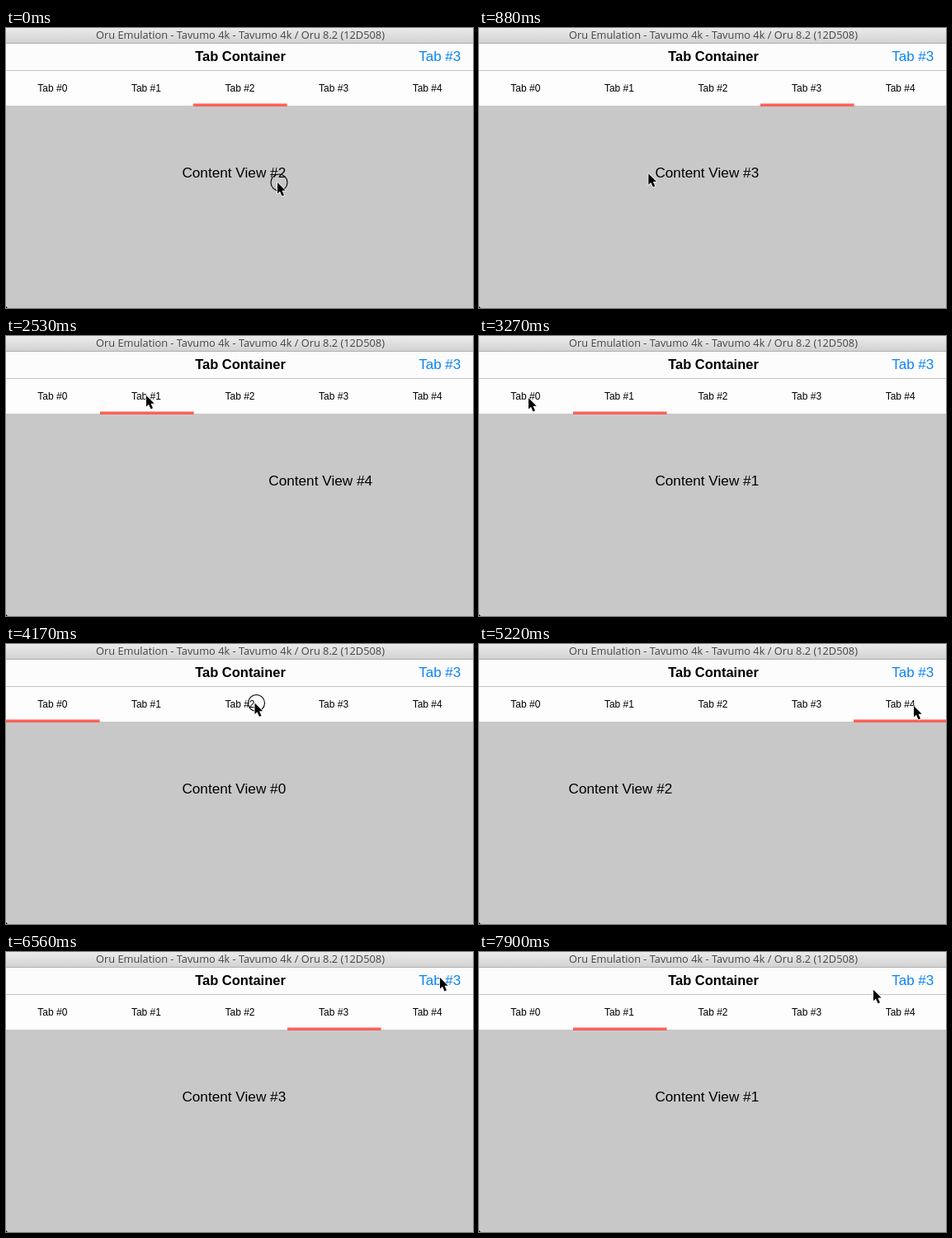
These frames come from a looping animation (566 px wide and 339 px high, 8000 ms). An HTML page:

```html
<!DOCTYPE html>
<html lang="en">
<head>
<meta charset="utf-8">
<title>Tab Container</title>
<style>
  html, body { margin: 0; width: 100%; height: 100%; overflow: hidden; background: #c8c8c8; }
  svg { display: block; }
  text { font-family: "Liberation Sans", Arial, sans-serif; text-anchor: middle; }
  .window-title { font: 12.8px "Open Sans", sans-serif; fill: #444; }
  .heading { font-size: 16.5px; font-weight: bold; }
  .button { font-size: 17px; fill: #0a84f5; }
  .tab { font-size: 12px; }
  .page { font-size: 17.2px; }
</style>
</head>
<body>
<svg width="566" height="339" viewBox="0 0 566 339">
  <defs>
    <linearGradient id="chrome" x2="0" y2="1">
      <stop stop-color="#ebebeb"/>
      <stop offset="1" stop-color="#d2d2d2"/>
    </linearGradient>
  </defs>
  <rect width="566" height="339" fill="#c8c8c8"/>
  <rect width="566" height="18" fill="url(#chrome)"/>
  <rect y="18" width="566" height="1" fill="#b0b0b0"/>
  <text class="window-title" x="284" y="13">Oru Emulation - Tavumo 4k - Tavumo 4k / Oru 8.2 (12D508)</text>
  <rect y="19" width="566" height="32" fill="#fcfcfc"/>
  <rect y="51" width="566" height="1" fill="#c4c4c4"/>
  <text class="heading" x="284" y="40">Tab Container</text>
  <text class="button" x="525.7" y="40">Tab #3</text>
  <rect y="52" width="566" height="42" fill="#fdfdfd"/>
  <g id="tabs"></g>
  <rect id="indicator" y="91.5" width="113.6" height="3.5" fill="#fc6158"/>
  <text class="page" id="outgoing" y="181"></text>
  <text class="page" id="incoming" y="181"></text>
  <path d="M0 337 L2 339 H0Z"/>
  <g id="cursor">
    <circle id="press" cx="2" r="10" fill="none" stroke="#000" stroke-width="1.1"/>
    <path d="M0 0 V13.5 L3 10.7 L5.5 16.4 L8 15.3 L5.5 9.7 H9.7Z"
          stroke="#fff" stroke-width="1.6" paint-order="stroke" stroke-linejoin="round"/>
  </g>
</svg>
<script>
const LOOP = 8000, STEP = 149, WIDTH = 566, TAB = 113.6, CENTER = 276.3;
const TRAVEL = 4, DRAG = 146.5, DRAG_END_Y = 175.5;
const $ = id => document.getElementById(id);

// The pointer leaves its last place, presses at (x, y) and brings up a page. Times are in steps.
const swipe = (leave, press, x, y, page) =>
  ({ leave, press, x, y, page, endX: x - DRAG, endY: DRAG_END_Y, hold: 5, start: press, span: 2.9, switchAt: 0.5 });
const tap = (leave, press, x, y, page) =>
  ({ leave, press, x, y, page, endX: x, endY: y, hold: 1, start: press + 0.75, span: 2, switchAt: 0 });

const gestures = [
  swipe(-4, 0.33, 329, 187, 3),
  swipe(4, 8.27, 329, 180, 4),
  tap(12, 15.7, 170, 72, 1),
  tap(18, 24, 60, 75, 0),
  tap(25, 28, 301.5, 71.5, 2),
  tap(29, 33.7, 527, 75, 4),
  tap(35, 40, 526, 31, 3),
  tap(46, 49, 170, 72, 1),
  tap(50, Infinity, 535, 41, 3),
];

const clamp = x => Math.min(1, Math.max(0, x));
const ease = x => clamp(x) ** 2 * (3 - 2 * clamp(x));
const mix = (a, b, k) => a + (b - a) * k;
const progressOf = (g, step) => ease((step - g.start) / g.span);

function placePage(id, page, x) {
  $(id).textContent = `Content View #${page}`;
  $(id).setAttribute("x", x);
}

function drawPages(step) {
  const index = Math.max(0, gestures.findLastIndex(g => step >= g.start));
  const gesture = gestures[index];
  const to = gesture.page, from = index ? gestures[index - 1].page : 2;
  const progress = progressOf(gesture, step);
  const shift = Math.sign(to - from) * WIDTH;
  placePage("outgoing", from, CENTER - shift * progress);
  placePage("incoming", to, CENTER + shift * (1 - progress));
  $("indicator").setAttribute("x", Math.round(TAB * (progress > gesture.switchAt ? to : from)));
}

function drawPointer(step) {
  const index = gestures.findLastIndex(g => step >= g.leave);
  const gesture = gestures[index];
  const pressStep = Math.floor(gesture.press);
  const previous = gestures[Math.max(0, index - 1)];
  const arrive = Math.min(pressStep, gesture.leave + TRAVEL);
  const travel = ease((step - gesture.leave) / (arrive - gesture.leave));
  // A dragged page follows the finger until it is let go.
  const drag = clamp(WIDTH * progressOf(gesture, step) / DRAG);
  const x = mix(mix(previous.endX, gesture.x, travel), gesture.endX, drag);
  const y = mix(mix(previous.endY, gesture.y, travel), gesture.endY, drag);
  $("cursor").setAttribute("transform", `translate(${x} ${y})`);

  // A swipe stays pressed on its last step, even as the next move begins.
  const held = gestures.some(g => step >= Math.floor(g.press) && step < Math.floor(g.press) + g.hold);
  $("press").setAttribute("visibility", held ? "visible" : "hidden");
}

function draw(time) {
  const step = Math.floor((time % LOOP + 12) / STEP);
  drawPages(step);
  drawPointer(step);
}

$("tabs").innerHTML = [0, 1, 2, 3, 4]
  .map(i => `<text class="tab" x="${56.3 + i * TAB}" y="77">Tab #${i}</text>`).join("");

const origin = performance.now();
(function tick() {
  draw(performance.now() - origin);
  requestAnimationFrame(tick);
})();
</script>
</body>
</html>
```
